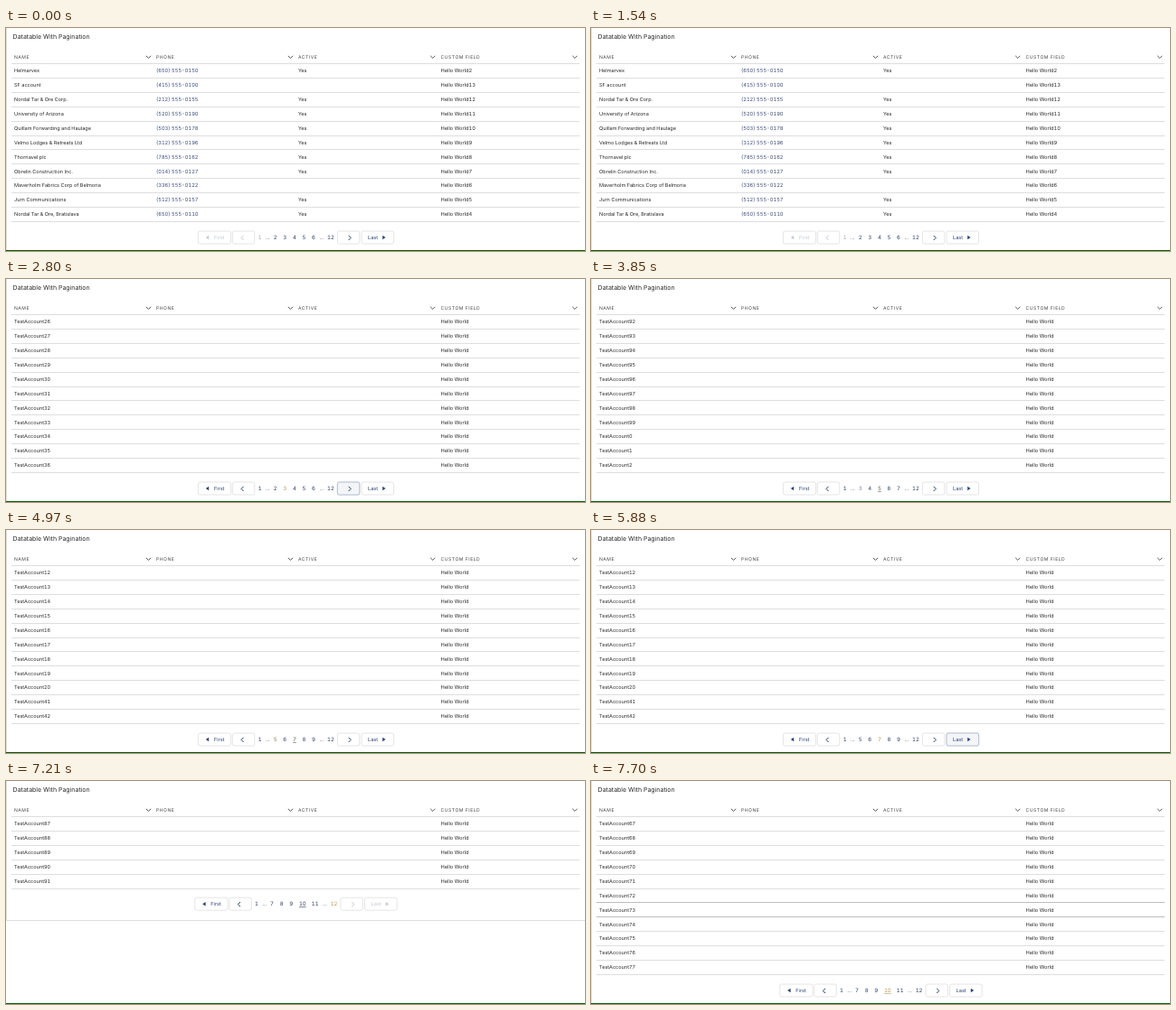
An HTML page for the animation above (8 s loop, 640 by 247 pixels).

```html
<!DOCTYPE html>
<html lang="en">
<head>
<meta charset="utf-8">
<title>Datatable With Pagination</title>
<style>
  html, body { margin: 0; width: 100%; height: 100%; overflow: hidden; background: #fff; }
  svg {
    display: block; width: 640px; height: 247px; fill: #2a2a2a;
    font: 5.55px Inter, "Open Sans", sans-serif;
    font-variant-numeric: tabular-nums; text-rendering: geometricPrecision;
  }
  .title { font-size: 7px; }
  .head { font-size: 5.1px; letter-spacing: .5px; fill: #444; }
  .wide { font-size: 5.7px; }
  .phone { font-size: 5.7px; fill: #3a4a78; }
  .pager { font-size: 6px; text-anchor: middle; fill: #2c3c62; }
  .label { font-size: 5.6px; fill: #2c4272; }
  .off { opacity: .28; }
  .chevron { fill: none; stroke: #555; stroke-width: 1; }
</style>
</head>
<body>
<svg id="stage" viewBox="0 0 640 247"></svg>
<script>
const LOOP = 8000, PITCH = 15.9, TOP = 39.5;
const INK = [44, 60, 98], GRAY = [165, 168, 176], TAN = [184, 148, 84];
const COLUMNS = [[9, 'NAME'], [166, 'PHONE'], [323, 'ACTIVE'], [480.5, 'CUSTOM FIELD']];

const hello = n => 'Hello World' + n;
const shared = ['Nordal Tar & Ore, Bratislava', '(650) 555-0110', 'Yes', hello(4)];
const accounts = (from, to) => Array.from({ length: to - from + 1 },
  (_, i) => ['TestAccount' + (from + i), '', '', hello('')]);

const PAGES = {
  1: [
    ['Helmarvex', '(650) 555-0150', 'Yes', hello(2)],
    ['SF account', '(415) 555-0100', '', hello(13)],
    ['Nordal Tar & Ore Corp.', '(212) 555-0155', 'Yes', hello(12)],
    ['University of Arizona', '(520) 555-0190', 'Yes', hello(11)],
    ['Quillam Forwarding and Haulage', '(503) 555-0178', 'Yes', hello(10)],
    ['Velmo Lodges & Retreats Ltd', '(312) 555-0196', 'Yes', hello(9)],
    ['Thornavel plc', '(785) 555-0162', 'Yes', hello(8)],
    ['Obrelin Construction Inc.', '(014) 555-0127', 'Yes', hello(7)],
    ['Maverholm Fabrics Corp of Belmoria', '(336) 555-0122', '', hello(6)],
    ['Jurn Communications', '(512) 555-0157', 'Yes', hello(5)],
    shared
  ],
  2: [
    shared,
    ['Nordal Tar & Ore, NZ', '+44 191 4980203', 'Yes', hello(3)],
    ['Brindlow Training', '', '', 'Test'],
    ['Growers Coop. of Merrova', '(850) 555-0142', '', hello(1)],
    ['Tobrin Community', '', '', hello('')],
    ...accounts(21, 26)
  ],
  3: accounts(26, 36),
  5: [...accounts(92, 99), ...accounts(0, 2)],
  7: [...accounts(12, 20), ...accounts(41, 42)],
  10: accounts(67, 77),
  12: accounts(87, 91)
};

// at: start, page: rows shown, first: first number of the window, fade: ms of colour change
const STATES = [
  { at: 0, page: 1, first: 2, from: GRAY, to: GRAY },
  { at: 1680, page: 2, first: 2, from: GRAY, to: GRAY, focus: 'next' },
  { at: 2800, page: 3, first: 2, from: TAN, to: GRAY, fade: 350, focus: 'next' },
  { at: 3780, page: 5, first: 3, from: INK, to: TAN, fade: 210, under: [5], prev: 3, prevColor: GRAY },
  { at: 4340, page: 5, first: 3, from: TAN, to: TAN, under: [5, 7] },
  { at: 4900, page: 7, first: 5, from: INK, to: TAN, fade: 210, under: [7], prev: 5, prevColor: TAN },
  { at: 5880, page: 7, first: 5, from: TAN, to: TAN, focus: 'last' },
  { at: 5950, page: 12, first: 7, from: TAN, to: TAN },
  { at: 6930, page: 12, first: 7, from: TAN, to: TAN, under: [10] },
  { at: 7630, page: 10, first: 7, from: INK, to: TAN, fade: 70, under: [10], prev: 12, prevColor: TAN, hoverRow: 6 }
];

const mix = (a, b, k) => `rgb(${a.map((v, i) => Math.round(v + (b[i] - v) * k))})`;
const text = (x, y, s, cls = '', style = '') =>
  `<text x="${x}" y="${y}" class="${cls}" style="${style}">${s}</text>`;
const line = (y, color = '#dedede', x1 = 6, x2 = 634) =>
  `<path d="M${x1} ${y}H${x2}" stroke="${color}" stroke-width="1"/>`;
const rowLine = i => Math.floor(TOP + PITCH * i) + .5;

function table(state) {
  let out = text(7.6, 12, 'Datatable With Pagination', 'title') + line(rowLine(0));
  for (const [x, name] of COLUMNS) {
    out += text(x, 34, name, 'head');
  }
  for (const x of [157.5, 314.5, 471.8, 628.8]) {
    out += `<path class="chevron" d="M${x - 2.6} 30.8l2.6 2.6 2.6 -2.6"/>`;
  }
  PAGES[state.page].forEach((row, i) => {
    const y = (TOP + PITCH * i + 9.7).toFixed(2);
    row.forEach((s, c) => {
      if (s) out += text(COLUMNS[c][0], y, s, ['', 'phone', '', 'wide'][c]);
    });
    out += line(rowLine(i + 1));
  });
  if (state.hoverRow) {
    out += line(rowLine(state.hoverRow), '#bdbdbd') + line(rowLine(state.hoverRow + 1), '#bdbdbd');
  }
  return out;
}

// dir: -1 points left, 1 points right
function button(x, y, w, dir, label, off, focus) {
  const mid = x + w / 2;
  const glow = focus
    ? `<rect x="${x - .7}" y="${y - 7.7}" width="${w + 1.4}" height="15.4" rx="2.6" fill="#e3e7ef"/>` : '';
  const box = `<rect x="${x}" y="${y - 7}" width="${w}" height="14" rx="2" ` +
    `fill="${focus ? '#f3f5f9' : '#fff'}" stroke="${focus ? '#b4bccb' : '#e3e3e3'}" stroke-width=".9"/>`;
  let inner;
  if (label) {
    const base = dir < 0 ? x + 11.8 : x + 23.2;
    inner = `<path d="M${base} ${y - 2.2}v4.4l${3.4 * dir} -2.2z" fill="#2c4272"/>` +
      text(dir < 0 ? x + 17.5 : x + 7, y + 2, label, 'label');
  } else {
    inner = `<path class="chevron" style="stroke:#2c3c62" ` +
      `d="M${mid} ${y - 2.2}l${2.6 * dir} 2.6 ${-2.6 * dir} 2.6"/>`;
  }
  return glow + box + `<g class="${off ? 'off' : ''}">${inner}</g>`;
}

function pager(state, t) {
  const y = state.page === 12 ? 136.2 : 232;
  const spread = state.first === 7;
  const left = spread ? -3.6 : 0, right = spread ? 3.6 : 0;
  const slots = spread ? [294, 304.7, 315.3, 327.8, 341.7] : [297.6, 308.2, 318.9, 329.4, 340];
  const k = state.fade ? Math.min(1, (t - state.at) / state.fade) : 1;
  const start = state.page === 1, end = state.page === 12;

  const number = (n, x) => {
    let color = mix(INK, INK, 0);
    if (n === state.page) color = mix(state.from, state.to, k);
    else if (n === state.prev) color = mix(state.prevColor, INK, k);
    const under = state.under && state.under.includes(n) ? ';text-decoration:underline' : '';
    return text(x, y + 2, n, 'pager', `fill:${color}${under}`);
  };

  return button(212.4 + left, y, 36.2, -1, 'First', start) +
    button(250.4 + left, y, 24.4, -1, '', start) +
    button(366.4 + right, y, 24.4, 1, '', end, state.focus === 'next') +
    button(393 + right, y, 35.6, 1, 'Last', end, state.focus === 'last') +
    number(1, 280.6 + left) + text(289.2 + left, y + 2, '...', 'pager') +
    slots.map((x, i) => number(state.first + i, x)).join('') +
    text(348.8 + right, y + 2, '...', 'pager') + number(12, 359 + right);
}

function scene(t) {
  const state = STATES.findLast(s => s.at <= t);
  const short = state.page === 12;
  const card = `<path d="M.5 0V${short ? 154.5 : 246}" stroke="#dedede"/>` +
    (short ? line(154.5, '#dedede', 0, 640) : '');
  return card + table(state) + pager(state, t) +
    '<rect y="246" width="640" height="1" fill="#07590a"/>';
}

const stage = document.getElementById('stage');
let shown = '';
function tick() {
  const next = scene(performance.now() % LOOP);
  if (next !== shown) stage.innerHTML = shown = next;
  requestAnimationFrame(tick);
}
tick();
</script>
</body>
</html>
```
